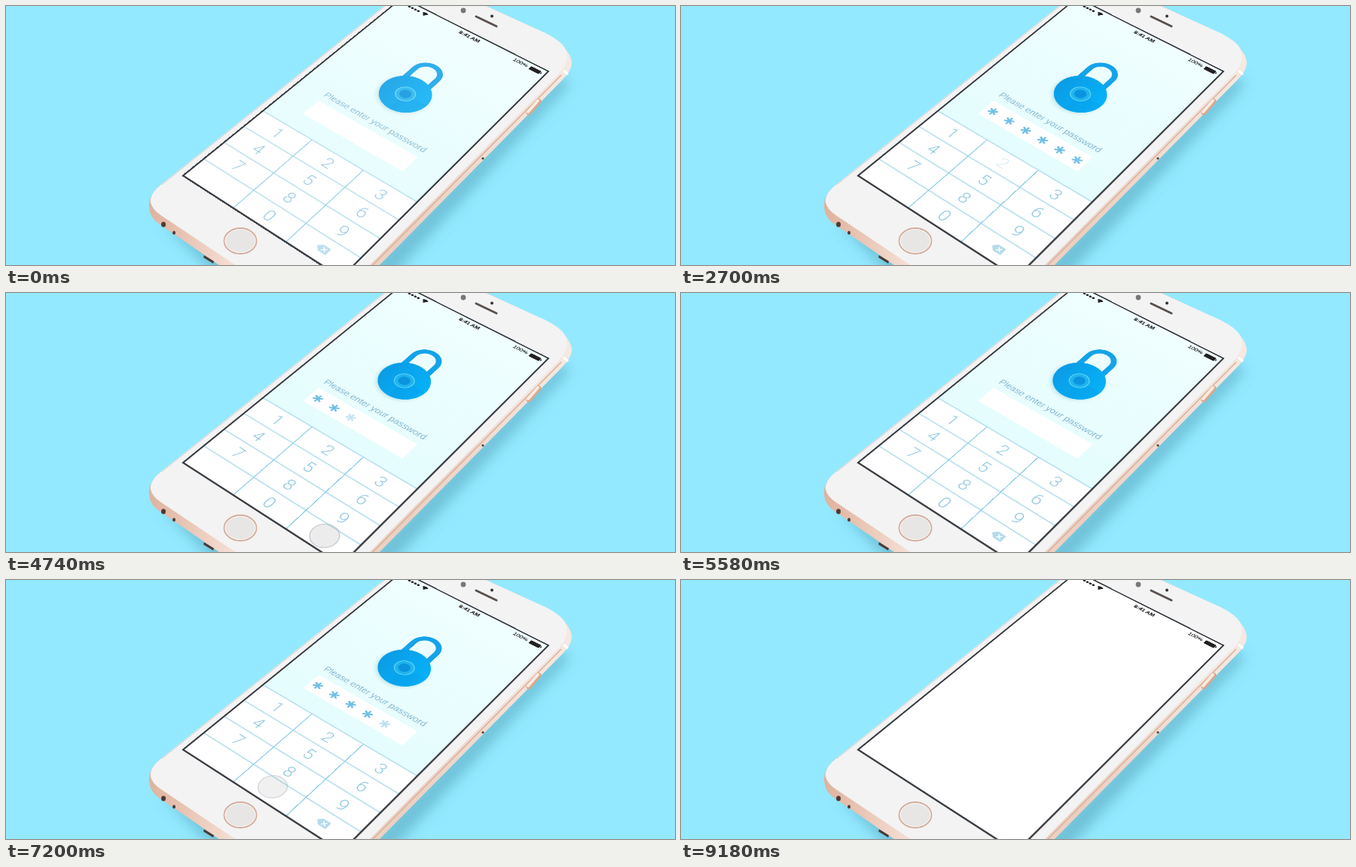
An HTML page for the animation above (9420 ms loop, 888 by 345 pixels).

```html
<!DOCTYPE html>
<html lang="en">
<head>
<meta charset="utf-8">
<title>Passcode lock</title>
<style>
html, body { margin: 0; width: 100%; height: 100%; overflow: hidden; background: #93e9ff; }
#stage { position: relative; width: 888px; height: 345px; overflow: hidden; }
svg { position: absolute; left: 0; top: 0; }
/* maps the flat 375 x 667 screen onto the tilted phone */
#screen {
  overflow: visible; transform-origin: 0 0;
  transform: matrix3d(.40022,.24718,0,-.00016266, -.49127,.30244,0,-.00023399, 0,0,1,0, 526,-11,0,1);
}
text { font-family: "Liberation Sans", Arial, sans-serif; text-anchor: middle; }
#keys text { font: 300 35px Roboto, "Open Sans", sans-serif; fill: #8dc6e0; }
.msg { font-size: 20px; }
.bar { font-size: 13.5px; fill: #222; stroke: #222; stroke-width: .3; }
</style>
</head>
<body>
<div id="stage">
<svg width="888" height="345">
  <defs>
    <linearGradient id="gold" x1="0" y1="0" x2="1" y2="0">
      <stop offset="0" stop-color="#dfb29d"/><stop offset=".2" stop-color="#f5dfd4"/>
      <stop offset=".6" stop-color="#ebcfc1"/><stop offset="1" stop-color="#f6e9e2"/>
    </linearGradient>
    <filter id="soft" x="-20%" y="-20%" width="140%" height="140%"><feGaussianBlur stdDeviation="9"/></filter>
  </defs>
  <path d="M205 285 L300 330 L490 340 L735 92 L748 104 L512 360 L300 380Z" fill="#4a97ad" opacity=".5" filter="url(#soft)"/>
  <path d="M503 -1 L207 237 Q188 252 190 268 Q191 282 203 290 L290 350 L491 350 L738 99 Q751 86 751 75 Q749 56 717 37 L636 -1Z" fill="url(#gold)"/>
  <path d="M503 -1 L207 237 Q190 250 192 262 Q194 271 206 279 L312 350 L478 350 L734 90 Q750 74 742 56 Q736 46 716 36 L634 -1Z" fill="#f3f3f3"/>
  <path d="M482 350 L737 92" stroke="#d9b09b" stroke-width="1.5"/>
  <path d="M503 0 L207 238" stroke="#d9d0cc" fill="none"/>
  <path d="M694 142 L707 127" stroke="#d6a98f" stroke-width="7" stroke-linecap="round"/>
  <path d="M693 141 L706 126" stroke="#faeade" stroke-width="4" stroke-linecap="round"/>
  <path d="M740 86 l6 5" stroke="#fff" stroke-width="3"/>
  <g fill="#4b3a36">
    <ellipse cx="209" cy="291" rx="3" ry="3.6"/><ellipse cx="223" cy="302" rx="2" ry="2.6"/>
    <circle cx="633" cy="203" r="1.6"/>
    <path d="M263 332 l13 8 l-1 3 l-13 -8z"/>
  </g>
  <ellipse cx="311" cy="313" rx="21.5" ry="17" fill="#e8e6e5" stroke="#d4ad9a" stroke-width="1.8"/>
  <ellipse cx="311" cy="313" rx="20" ry="15.5" fill="none" stroke="#f8f6f5"/>
  <circle cx="607" cy="6" r="3.4" fill="#777"/><circle cx="645" cy="13.5" r="2" fill="#333"/>
  <path d="M624 14 L651 27" stroke="#5a504d" stroke-width="3" stroke-linecap="round"/>
</svg>

<svg id="screen" width="375" height="667">
  <defs>
    <linearGradient id="bg" x1="0" y1="0" x2="0" y2="1">
      <stop offset="0" stop-color="#f0feff"/><stop offset=".65" stop-color="#e5fdfe"/>
    </linearGradient>
    <linearGradient id="blue" x1="0" y1="0" x2="1" y2="0">
      <stop offset="0" stop-color="#0a9ce6"/><stop offset="1" stop-color="#06b2f8"/>
    </linearGradient>
    <filter id="blur" x="-30%" y="-30%" width="160%" height="160%"><feGaussianBlur stdDeviation="4"/></filter>
  </defs>
  <rect width="375" height="667" fill="#fff"/>
  <g id="ui">
    <rect width="375" height="667" fill="url(#bg)"/>
    <g id="lock">
      <circle cx="186" cy="241" r="53" fill="#69b4c9" opacity=".35" filter="url(#blur)"/>
      <path id="shackle" fill="none" stroke="#14a3ea" stroke-width="12"/>
      <circle cx="187.5" cy="237" r="53" fill="url(#blue)"/>
      <path d="M187.5 237 L187.5 290 A53 53 0 0 0 240.5 237Z" fill="#0785d4" opacity=".15"/>
      <circle cx="187.5" cy="237" r="20" fill="#1fb4ee" stroke="#63d6f4" stroke-width="2"/>
      <circle cx="187.5" cy="237" r="12" fill="#0a94de"/>
      <g id="check">
        <circle cx="187.5" cy="237" r="20" fill="#5cba5e" stroke="#b9ecc4" stroke-width="3"/>
        <path d="M179 237 l6 7 l11 -13" fill="none" stroke="#fff" stroke-width="4"/>
      </g>
    </g>
    <text id="ask" class="msg" x="187.5" y="344" fill="#84b9d2">Please enter your password</text>
    <text id="ok" class="msg" x="187.5" y="344" fill="#4fb85c">Accepted!</text>
    <rect x="66" y="360" width="243" height="47" fill="#fff"/>
    <g id="stars" stroke-width="3.8"></g>
    <rect y="449.5" width="375" height="217.5" fill="#fff"/>
    <path d="M0 449.5H375M0 504H375M0 558.5H375M0 613H375" stroke="#b4deed" stroke-width="2.6"/>
    <path d="M125 449.5V667M250 449.5V667" stroke="#86cae6" stroke-width="1.8"/>
    <g id="keys"></g>
    <circle id="touch" r="26" fill="#a39f9f" fill-opacity=".2" stroke="#87909a" stroke-opacity=".5" stroke-width="1.6"/>
  </g>
  <g fill="#222">
    <circle cx="30" cy="14" r="3"/><circle cx="38" cy="14" r="3"/><circle cx="46" cy="14" r="3"/><circle cx="54" cy="14" r="3"/>
    <path d="M64 11 q7 -6 14 0 l-7 9z"/>
    <rect x="339" y="9" width="25" height="11" rx="2"/><rect x="365" y="12" width="2" height="5"/>
  </g>
  <text class="bar" x="187.5" y="18" font-weight="bold">9:41 AM</text>
  <text class="bar" x="316" y="18">100%</text>
  <rect width="375" height="667" fill="none" stroke="#30343a" stroke-width="3.4"/>
</svg>
</div>
<script>
const LOOP = 9420, STEP = 235, REJECT = 2800, ACCEPT = 7560;
const $ = id => document.getElementById(id);
const ramp = (t, from, to) => Math.min(1, Math.max(0, (t - from) / (to - from)));
const easeOut = x => 1 - (1 - x) ** 3;
const fade = (el, v) => el.setAttribute("opacity", v.toFixed(3));

function add(parent, tag, attrs, text = "") {
  const el = document.createElementNS("http://www.w3.org/2000/svg", tag);
  for (const k in attrs) el.setAttribute(k, attrs[k]);
  el.textContent = text;
  return parent.appendChild(el);
}

const keys = {};
[..."123456789 0<"].forEach((name, i) => {
  if (name === " ") return;
  const x = 62.5 + i % 3 * 125, y = 477 + Math.floor(i / 3) * 54.5;
  let el;
  if (name === "<") {
    el = add($("keys"), "g", {});
    add(el, "path", { d: `M${x - 15} ${y - 2} l8 -8 h17 v16 h-17z`, fill: "#b3dbeb" });
    add(el, "path", { d: `M${x - 3} ${y - 6} l8 8 m0 -8 l-8 8`, stroke: "#fff", "stroke-width": 2.2 });
  } else {
    el = add($("keys"), "text", { x, y: y + 12 }, name);
  }
  keys[name] = { x, y, el };
});

const stars = Array.from({ length: 6 }, (_, i) =>
  add($("stars"), "path", {
    d: "M0 -10V10M-8.7 -5L8.7 5M-8.7 5L8.7 -5",
    transform: `translate(${84.4 + i * 41.25} 384)`
  }));

const presses = [];
function type(names, start) {
  [...names].forEach((name, i) => presses.push({ name, at: start + i * STEP }));
}
type("258062", 1320);
type("<<<<<<", 3965);
type("215803", 6155);

function starLevel(i, t) {
  if (t >= 6155) return ramp(t, 6155 + i * STEP, 6375 + i * STEP);
  const gone = 3965 + (5 - i) * STEP;
  return ramp(t, 1320 + i * STEP, 1540 + i * STEP) * (1 - ramp(t, gone, gone + 120));
}

function draw(now) {
  const t = now % LOOP;
  fade($("ui"), (.88 + .12 * ramp(t, 0, 300)) * (1 - ramp(t, 8400, 9180)));

  // key presses: the label blanks out, a touch ring flashes and slides off
  for (const k in keys) fade(keys[k].el, 1);
  fade($("touch"), 0);
  for (const { name, at } of presses) {
    const d = t - at, key = keys[name];
    if (d < -80 || d > 270) continue;
    const label = 1 - ramp(d, -80, 50) + ramp(d, 180, 260);
    fade(key.el, Math.min(label, +key.el.getAttribute("opacity")));
    if (d < 200 && d >= -35) {
      const away = ramp(d, 80, 200);
      fade($("touch"), ramp(d, -35, 60) * (1 - away));
      $("touch").setAttribute("cx", key.x);
      $("touch").setAttribute("cy", key.y - 4 - 24 * away);
    }
  }

  const green = ramp(t, ACCEPT, ACCEPT + 200);
  const mix = (a, b) => Math.round(a + (b - a) * green);
  $("stars").setAttribute("stroke", `rgb(${mix(111, 78)},${mix(191, 184)},${mix(230, 92)})`);
  stars.forEach((s, i) => fade(s, starLevel(i, t)));

  // lock: sideways shake, then the shackle lifts
  const shake = ramp(t, REJECT, REJECT + 600);
  const dx = 9 * Math.sin(shake * Math.PI * 6) * (1 - shake) - 2 * shake;
  $("lock").setAttribute("transform", `translate(${dx.toFixed(2)} ${shake})`);
  const top = 164 - 22 * easeOut(ramp(t, ACCEPT, ACCEPT + 300));
  $("shackle").setAttribute("d", `M157 230 V${top} A28 28 0 0 1 213 ${top} v31`);

  fade($("check"), green);
  fade($("ask"), 1 - green);
  fade($("ok"), green);
  requestAnimationFrame(() => draw(performance.now() - begin));
}
const begin = performance.now();
draw(0);
</script>
</body>
</html>
```
